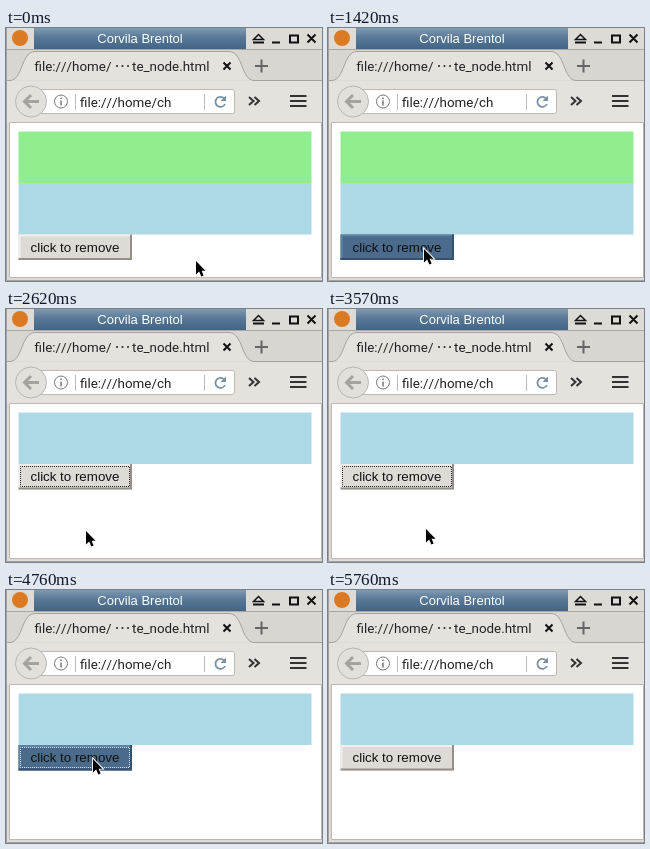
An HTML page for the animation above (6060 ms loop, 316 by 253 pixels).

```html
<!DOCTYPE html>
<html lang="en">
<head>
<meta charset="utf-8">
<title>Remove node</title>
<style>
  html, body { margin: 0; width: 100%; height: 100%; overflow: hidden; background: #dedbd7; }
  svg { display: block; width: 100%; height: 100%; }
  text { font-family: "Liberation Sans", Arial, sans-serif; fill: #111; }
  .ui { font-family: Roboto, sans-serif; font-size: 13.4px; font-kerning: none; fill: #222; }
  .line { fill: none; stroke: #111; stroke-width: 2; }
</style>
</head>
<body>
<svg viewBox="0 0 316 253">
  <defs>
    <linearGradient id="bar" x2="0" y2="1">
      <stop offset="0" stop-color="#7f9bb3"/>
      <stop offset=".45" stop-color="#587896"/>
      <stop offset="1" stop-color="#426486"/>
    </linearGradient>
    <clipPath id="url"><rect x="70" y="62" width="98" height="24"/></clipPath>
  </defs>

  <!-- title bar -->
  <rect width="316" height="253" fill="#dedbd7"/>
  <rect x="28" width="212" height="21" fill="url(#bar)"/>
  <path d="M0 21.500H316" stroke="#a9a7a3"/>
  <circle cx="14" cy="10" r="8" fill="#dc7a24"/>
  <text x="134" y="14.500" font-size="13" text-anchor="middle" style="fill:#fff">Corvila Brentol</text>
  <path d="M247.500 11.500L252.500 6.500L257.500 11.500Z" class="line" style="stroke-width:1.500"/>
  <path d="M247 14.500H258M266 14.500H274M284 7.500H292V14.500H284ZM301.500 6.500L309.500 14.500M309.500 6.500L301.500 14.500" class="line"/>

  <!-- tab strip -->
  <rect y="22" width="316" height="31" fill="#d9d6d2"/>
  <path d="M4 52.500C17 52 15 23.500 29 23.500H223C237 23.500 235 52 248 52.500Z" fill="#e5e2de"/>
  <path d="M0 52.500H4C17 52 15 23.500 29 23.500H223C237 23.500 235 52 248 52.500H316" fill="none" stroke="#a5a29e"/>
  <text class="ui" x="28.500" y="42.500">file:///home/</text>
  <g fill="#222">
    <circle cx="111" cy="38" r="1"/><circle cx="116.500" cy="38" r="1"/><circle cx="122" cy="38" r="1"/>
  </g>
  <text class="ui" x="126" y="42.500">te_node.html</text>
  <path d="M217.500 34.500L224.500 41.500M224.500 34.500L217.500 41.500" class="line"/>
  <path d="M249 38H262M255.500 31.500V44.500" class="line" style="stroke:#666"/>

  <!-- toolbar -->
  <rect y="53" width="316" height="42" fill="#e5e2de"/>
  <rect x="30.500" y="61.500" width="198" height="24" rx="2" fill="#fff" stroke="#bcb9b5"/>
  <circle cx="25" cy="73.500" r="15.500" fill="#e3e0dc" stroke="#b9b6b2"/>
  <path d="M33 73.500H19M25 67L18.500 73.500L25 80" fill="none" stroke="#a5a3a0" stroke-width="3"/>
  <circle cx="55" cy="73.500" r="6.500" fill="none" stroke="#777"/>
  <path d="M55 72.500V77.500M55 69.500V71" stroke="#777" stroke-width="1.500"/>
  <path d="M69.500 66V82M198.500 66V82" stroke="#bbb"/>
  <text class="ui" x="74" y="78.500" clip-path="url(#url)">file:///home/ch</text>
  <path d="M218.500 71A5 5 0 1 0 219 76" fill="none" stroke="#7890a6" stroke-width="1.800"/>
  <path d="M220 67.500V73H214.500Z" fill="#7890a6"/>
  <path d="M243 69L247.500 73L243 77M248.500 69L253 73L248.500 77" class="line" style="stroke:#333"/>
  <path d="M284 68H300.500M284 73H300.500M284 78H300.500" class="line" style="stroke:#333"/>

  <!-- page -->
  <rect x="4" y="95" width="311" height="154" fill="#fff"/>
  <path d="M3.500 249V94.500H315.500V249.500H3.500" fill="none" stroke="#bbb8b4"/>
  <path d="M.5 0V252.500H316" fill="none" stroke="#a5a3a0"/>
  <rect id="green" x="12.500" y="103.500" width="293" height="52" fill="#90ee90"/>
  <rect id="blue" x="12.500" width="293" height="51.500" fill="#add8e6"/>
  <g id="button">
    <rect id="face" x="12.500" width="113.500" height="25.500"/>
    <path id="light" d="M13.500 25V1H126" fill="none" stroke-width="2"/>
    <path id="dark" d="M12.500 24.500H125V0" fill="none" stroke-width="2"/>
    <rect id="ring" x="14.500" y="2.500" width="109" height="20" fill="none"
      stroke-dasharray="1 1" stroke-dashoffset=".5"/>
    <text x="24.500" y="17.300" font-size="13.333">click to remove</text>
  </g>
  <path id="cursor" d="M1 1V14.500L4.200 11.600L6.300 16.400L8.600 15.400L6.600 10.700H10.500Z"
    fill="#000" stroke="#fff" stroke-width="1.800" paint-order="stroke"/>
</svg>
<script>
const LOOP = 6060;
const $ = id => document.getElementById(id);
const smooth = p => p * p * (3 - 2 * p);
const linear = p => p;

// Stepped cursor moves: start, end, steps, target x, target y, easing
const moves = [
  [600, 900, 6, 130, 228, smooth],
  [1080, 1540, 8, 89, 219, smooth],
  [1780, 2020, 5, 79, 221, smooth],
  [3220, 3330, 3, 98, 222, linear],
  [3570, 3980, 7, 86, 168, smooth],
  [5240, 5350, 3, 109, 196, linear],
  [5410, 5760, 6, 232, 266, linear]
];
const path = [[0, 189, 232]];
for (const [t0, t1, n, x, y, ease] of moves) {
  const [, x0, y0] = path[path.length - 1];
  for (let i = 0; i < n; i++) {
    const p = ease((i + 1) / n);
    path.push([t0 + (t1 - t0) * i / (n - 1), x0 + (x - x0) * p, y0 + (y - y0) * p]);
  }
}

// Button states: time, look, focus ring
const states = [
  [0, "plain", false],
  [1210, "hover", false],
  [2620, "plain", true],
  [3850, "hover", false],
  [4580, "press", true],
  [4760, "hover", true],
  [5410, "plain", true],
  [5760, "plain", false]
];
// Colours: face, light edge, dark edge, ring
const looks = {
  plain: ["#dedbd7", "#f0eeec", "#93908c", "#222"],
  hover: ["#4a6b8c", "#5f82a2", "#34516d", "#d5dfe8"],
  press: ["#4a6b8c", "#34516d", "#5f82a2", "#d5dfe8"]
};

const latest = (rows, t) => rows.findLast(row => row[0] <= t);

function draw(t) {
  const [, x, y] = latest(path, t);
  $("cursor").setAttribute("transform", `translate(${Math.round(x)} ${Math.round(y)})`);

  const removed = t >= 2620;
  $("green").style.display = removed ? "none" : "";
  $("blue").setAttribute("y", removed ? 103.5 : 155);
  $("button").setAttribute("transform", `translate(0 ${removed ? 155 : 206.5})`);

  const [, look, focus] = latest(states, t);
  const [face, light, dark, ring] = looks[look];
  $("face").style.fill = face;
  $("light").style.stroke = light;
  $("dark").style.stroke = dark;
  $("ring").style.stroke = ring;
  $("ring").style.display = focus ? "" : "none";
}

const start = performance.now();
function tick() {
  draw((performance.now() - start) % LOOP);
  requestAnimationFrame(tick);
}
tick();
</script>
</body>
</html>
```
